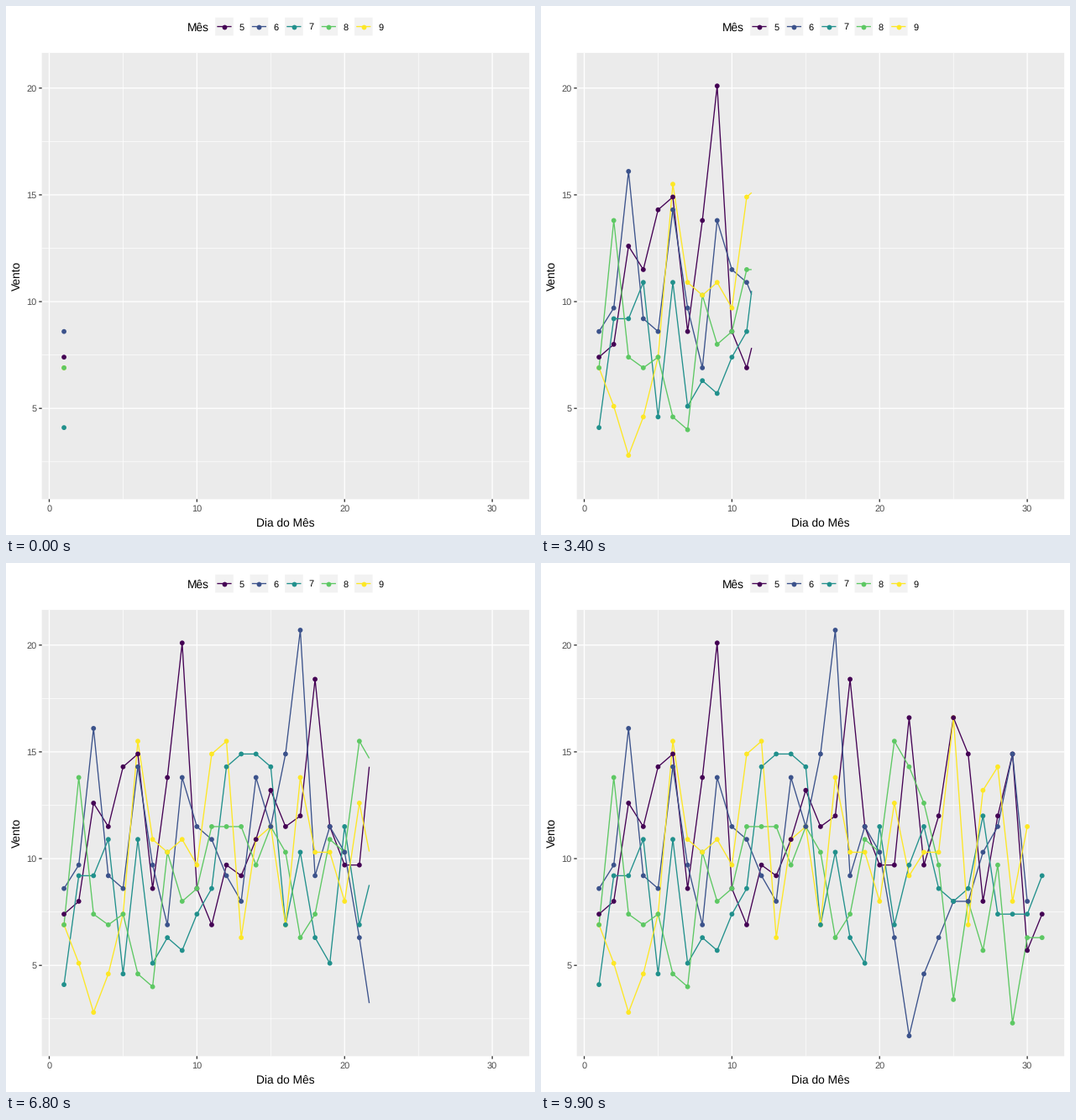
Animation, 630 px wide and 630 px high, one loop 10 s. Source, as a matplotlib script:

```python
import numpy as np
import matplotlib.pyplot as plt
from matplotlib.animation import FuncAnimation
from matplotlib.patches import Rectangle

plt.rcParams.update({"font.family": "Liberation Sans", "text.hinting": "none",
                     "path.simplify": False})

SIZE, FRAMES, INTERVAL = 630, 100, 100
LEFT, RIGHT, TOP, BOTTOM = 42.7, 623.1, 55.8, 587.3
LINE, DOT = 1.33, 5.8
COLORS = ["#440154", "#3B528B", "#21908C", "#5DC863", "#FDE725"]

# daily wind speed, one series per month
may = [7.4, 8, 12.6, 11.5, 14.3, 14.9, 8.6, 13.8, 20.1, 8.6, 6.9, 9.7, 9.2, 10.9, 13.2, 11.5,
       12, 18.4, 11.5, 9.7, 9.7, 16.6, 9.7, 12, 16.6, 14.9, 8, 12, 14.9, 5.7, 7.4]
june = [8.6, 9.7, 16.1, 9.2, 8.6, 14.3, 9.7, 6.9, 13.8, 11.5, 10.9, 9.2, 8, 13.8, 11.5, 14.9,
        20.7, 9.2, 11.5, 10.3, 6.3, 1.7, 4.6, 6.3, 8, 8, 10.3, 11.5, 14.9, 8]
july = [4.1, 9.2, 9.2, 10.9, 4.6, 10.9, 5.1, 6.3, 5.7, 7.4, 8.6, 14.3, 14.9, 14.9, 14.3, 6.9,
        10.3, 6.3, 5.1, 11.5, 6.9, 9.7, 11.5, 8.6, 8, 8.6, 12, 7.4, 7.4, 7.4, 9.2]
august = [6.9, 13.8, 7.4, 6.9, 7.4, 4.6, 4, 10.3, 8, 8.6, 11.5, 11.5, 11.5, 9.7, 11.5, 10.3,
          6.3, 7.4, 10.9, 10.3, 15.5, 14.3, 12.6, 9.7, 3.4, 8, 5.7, 9.7, 2.3, 6.3, 6.3]
september = [6.9, 5.1, 2.8, 4.6, 7.4, 15.5, 10.9, 10.3, 10.9, 9.7, 14.9, 15.5, 6.3, 10.9, 11.5,
             6.9, 13.8, 10.3, 10.3, 8, 12.6, 9.2, 10.3, 10.3, 16.6, 6.9, 13.2, 14.3, 8, 11.5]
months = [may, june, july, august, september]


def px(day):
    return LEFT + (np.asarray(day) + 0.5) / 33 * (RIGHT - LEFT)


def py(wind):
    return BOTTOM - (np.asarray(wind) - 0.75) / 20.9 * (BOTTOM - TOP)


fig = plt.figure(figsize=(SIZE / 72, SIZE / 72), dpi=72, facecolor="white")
ax = fig.add_axes([0, 0, 1, 1])
ax.set(xlim=(0, SIZE), ylim=(SIZE, 0))
ax.axis("off")


def rect(x0, y0, x1, y1, color):
    ax.add_patch(Rectangle((x0, y0), x1 - x0, y1 - y0, fc=color, lw=0, snap=False))


def stroke(xs, ys, color, width=LINE, z=2):
    return ax.plot(xs, ys, color=color, lw=width, solid_capstyle="butt",
                   solid_joinstyle="round", snap=False, zorder=z)[0]


def dots(xs, ys, colors, z):
    return ax.scatter(xs, ys, s=DOT ** 2, c=colors, linewidths=0, snap=False, zorder=z)


def label(x, y, text, size=11, color="black", **kw):
    ax.text(x, y, text, fontsize=size, color=color, va="baseline", **kw)


# panel, grid and axes
rect(LEFT, TOP, RIGHT, BOTTOM, "#EBEBEB")
for day in (5, 15, 25):
    stroke([px(day)] * 2, [TOP, BOTTOM], "white", LINE / 2)
for wind in (2.5, 7.5, 12.5, 17.5):
    stroke([LEFT, RIGHT], [py(wind)] * 2, "white", LINE / 2)
for wind in (5, 10, 15, 20):
    stroke([LEFT, RIGHT], [py(wind)] * 2, "white")
    stroke([LEFT - 3.4, LEFT], [py(wind)] * 2, "#333333")
    label(36.5, py(wind) + 4, str(wind), color="#4D4D4D", ha="right")
for day in (0, 10, 20, 30):
    stroke([px(day)] * 2, [TOP, BOTTOM], "white")
    stroke([px(day)] * 2, [BOTTOM, BOTTOM + 3.4], "#333333")
    label(px(day), 601.6, str(day), color="#4D4D4D", ha="center")
label((LEFT + RIGHT) / 2, 620, "Dia do Mês", 13.75, ha="center")
label(17, (TOP + BOTTOM) / 2, "Vento", 13.75, ha="center",
      rotation=90, rotation_mode="anchor")

# legend
label(216, 29.4, "Mês", 13.75)
for k, color in enumerate(COLORS):
    x, y = 260 + 41.45 * k, 24.5
    rect(x - 10.8, y - 10.8, x + 10.8, y + 10.8, "#F2F2F2")
    stroke([x - 8.6, x + 8.6], [y, y], color)
    dots([x], [y], [color], 3)
    label(x + 17.3, 28.4, str(k + 5))

# every day lands on a whole step, the lines run evenly between them
days = np.arange(1, 32)
steps = np.array([round(float(s)) for s in (FRAMES - 1) * (days - 1) / 30])

# points stack by the text order of their running number
points = [(d + 1, w, COLORS[m]) for m, series in enumerate(months)
          for d, w in enumerate(series)]
order = sorted(range(len(points)), key=lambda i: str(i + 1))
points = [points[i] for i in order]
point_day = np.array([p[0] for p in points])
point_xy = np.column_stack([px(point_day), py([p[1] for p in points])])
point_color = np.array([p[2] for p in points])

lines = [stroke([], [], color, z=4 + 0.1 * k) for k, color in enumerate(COLORS)]
cloud = dots(point_xy[:, 0], point_xy[:, 1], point_color, 6)


def update(frame):
    head = np.interp(frame, steps, days)
    for line, series in zip(lines, months):
        span = days[:len(series)]
        end = min(head, len(series))
        xs = np.append(span[span < end], end)
        line.set_data(px(xs), py(np.interp(xs, span, series)))
    shown = point_day <= head + 1e-9
    cloud.set_offsets(point_xy[shown])
    cloud.set_facecolor(point_color[shown])
    return [*lines, cloud]


anim = FuncAnimation(fig, update, frames=FRAMES, interval=INTERVAL,
                     repeat=True, repeat_delay=0)
plt.show()
```
